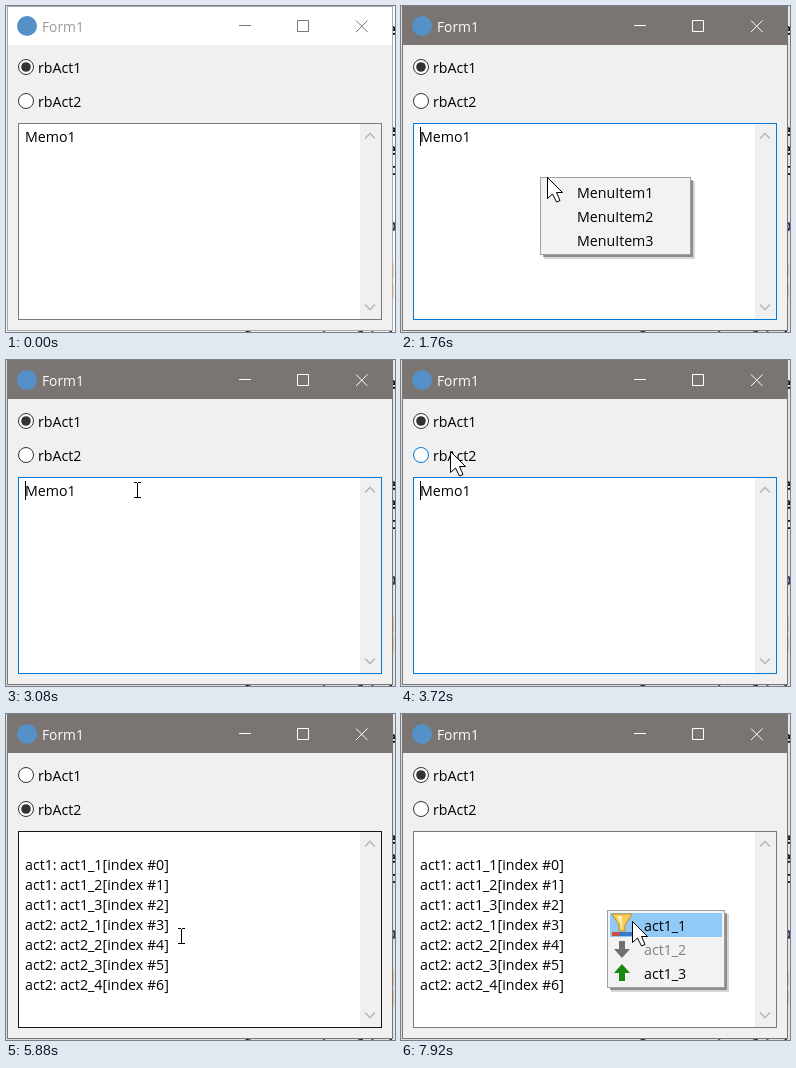
Write an HTML page that moves like this. It is 389 by 326 pixels and loops after 8 s.

```html
<!DOCTYPE html>
<html lang="en">
<head>
<meta charset="utf-8">
<title>Form1</title>
<style>
  html, body { margin: 0; width: 100%; height: 100%; overflow: hidden; }
  svg { display: block; width: 389px; height: 326px; font: 14.2px "Open Sans", "Noto Sans", sans-serif; }
  text { white-space: pre; }
  .code { font: bold 16px "DejaVu Sans Mono", monospace; }
  .beam { mix-blend-mode: difference; }
</style>
</head>
<body>
<svg id="stage" viewBox="0 0 389 326"></svg>
<script>
const LOOP = 8000, STEP = 40;
const BLUE = '#0078d7', DARK = '#333';
const stage = document.getElementById('stage');

// Pointer path: time, x, y
const path = [
  [720, 300, 270], [1120, 139, 171], [1720, 139, 171], [1760, 146, 171],
  [2120, 210, 213], [2320, 210, 213], [2440, 214, 214], [2600, 214, 214],
  [2640, 216, 214], [3440, 62, 62], [3720, 49, 91], [3840, 49, 91],
  [3960, 44, 94], [4040, 44, 94], [4280, 85, 70], [4800, 146, 181],
  [5240, 146, 181], [5600, 175, 222], [5880, 175, 222], [6320, 60, 50],
  [6560, 60, 52], [6800, 116, 80], [6840, 116, 80], [7200, 206, 196],
  [7800, 206, 196], [7920, 231, 207], [LOOP, 231, 207]
];
const menus = [
  { x: 139, y: 171, w: 151, open: 1440, close: 2640, items: ['MenuItem1', 'MenuItem2', 'MenuItem3'] },
  { x: 146, y: 181, w: 118, open: 5120, close: 5840, items: ['act2_1', 'act2_2', 'act2_3', 'act2_4'] },
  { x: 206, y: 196, w: 118, open: 7440, close: LOOP, items: ['act1_1', 'act1_2', 'act1_3'], icons: true, disabled: 1 }
];
const log = [1, 2, 3, 4, 5, 6, 7].map((n, i) => {
  const group = i < 3 ? 1 : 2;
  return `act${group}: act${group}_${group === 1 ? n : n - 3}[index #${i}]`;
});

const text = (x, y, s, fill = '#000', more = '') => `<text x="${x}" y="${y}" fill="${fill}" ${more}>${s}</text>`;
const rect = (x, y, w, h, fill, more = '') => `<rect x="${x}" y="${y}" width="${w}" height="${h}" fill="${fill}" ${more}/>`;
const line = (d, stroke, width = 1) => `<path d="${d}" fill="none" stroke="${stroke}" stroke-width="${width}"/>`;
const shape = (d, fill, more = '') => `<path d="${d}" fill="${fill}" ${more}/>`;

function pointerAt(t) {
  const i = path.findIndex(p => p[0] > t);
  if (i === 0) return null;
  const [t0, x0, y0] = path[i - 1], [t1, x1, y1] = path[i];
  const k = (t - t0) / (t1 - t0);
  return { x: Math.round(x0 + (x1 - x0) * k), y: Math.round(y0 + (y1 - y0) * k) };
}

function backdrop(active) {
  const glyphs = [['e', 29], ['e', 130], ['e', 149], ['t', 169], ['p', 225], [']', 269], [']', 289]];
  return rect(0, 0, 389, 326, active ? '#dedede' : '#f0f0f0') +
    rect(387, 0, 2, 326, active ? '#e4e4e4' : '#fafafa') +
    glyphs.map(([s, y]) => text(381, y, s, s === 'p' ? '#335' : s === ']' ? '#c80' : '#111', 'class="code"')).join('') +
    text(236, 336, 'for  assign list', '#222', 'class="code"');
}

function frame(active) {
  const ink = active ? '#fff' : '#777';
  return rect(1.5, .5, 385, 324, '#f0f0f0', `stroke="${active ? '#777' : '#aaa'}"`) +
    rect(2, 1, 384, 38, active ? '#7a7473' : '#fff') +
    '<circle cx="21" cy="20" r="10" fill="#5690c8"/>' +
    text(36, 25.5, 'Form1', active ? '#fff' : '#999', 'font-size="13.8"') +
    line('M233 19.5H245M291.5 14.5H302.5V25.5H291.5ZM350 14.5L361.5 26M361.5 14.5L350 26', ink);
}

function radio(y, label, checked, hover) {
  const ink = hover ? BLUE : DARK;
  return `<circle cx="20" cy="${y}" r="7.5" fill="#fff" stroke="${ink}"/>` +
    (checked ? `<circle cx="20" cy="${y}" r="4.8" fill="${ink}"/>` : '') +
    text(32, y + 5.5, label);
}

function memo(border, lines, caret) {
  return rect(12.5, 117.5, 363, 196, '#fff', `stroke="${border}"`) +
    rect(354, 118, 21, 195, '#f0f0f0') +
    line('M359 132.5L364 127.5L369 132.5M359 298.5L364 303.5L369 298.5', '#bbb', 1.7) +
    lines.map((s, i) => text(19, 136 + 20 * i, s)).join('') +
    (caret ? rect(19, 121, 1, 19, '#000') : '');
}

function icon(i, x, y) {
  if (i === 0) return shape(`M${x - 10} ${y - 11}H${x + 10}L${x + 3} ${y}V${y + 6}H${x - 3}V${y}Z`, '#f5cd58', 'stroke="#c58b24"') +
    shape(`M${x - 5} ${y - 9}H${x}V${y + 4}H${x - 1}V${y}Z`, '#fff0b0') +
    rect(x - 10, y + 7, 20, 4, '#3d78c4') + rect(x - 10, y + 7, 7, 4, '#d34b3c');
  const s = i === 1 ? 1 : -1;
  return shape(`M${x - 3} ${y - 8 * s}h6v${8 * s}h5L${x} ${y + 9 * s}L${x - 8} ${y}h5Z`, s > 0 ? '#707070' : '#188a12');
}

function popup(m, t, p) {
  const { x, y, w, items } = m, h = items.length * 24 + 6;
  const row = p.x > x + 8 ? Math.floor((p.y - y - 3) / 24) : -1;
  const label = i => text(x + 37, y + 21 + 24 * i, items[i], i === m.disabled ? '#808080' : '#000');
  const highlight = i => rect(x + 3, y + 3 + 24 * i, w - 6, 24, '#91c9f7');
  if (t >= m.close) {
    const fade = .67 * (1 - (t - m.close) / 240);
    return m === menus[0] && fade > 0 ? `<g opacity="${fade}">${highlight(1) + label(1)}</g>` : '';
  }
  const opacity = Math.min(1, .4 + (t - m.open) / 200);
  return `<g opacity="${opacity}">` +
    rect(x + 4, y + 4, w, h, '#000', 'opacity=".16"') + rect(x + 3, y + 3, w - 1, h - 1, '#000', 'opacity=".35"') +
    rect(x + .5, y + .5, w - 1, h - 1, '#f2f2f2', 'stroke="#a0a0a0"') +
    (items[row] ? highlight(row) : '') +
    items.map((_, i) => label(i) + (m.icons ? icon(i, x + 15, y + 15 + 24 * i) : '')).join('') + '</g>';
}

function cursor({ x, y }, beam) {
  return beam
    ? `<path class="beam" d="M${x - 3} ${y - 7.5}h3m1 0h3M${x + .5} ${y - 7}v15M${x - 3} ${y + 7.5}h3m1 0h3" fill="none" stroke="#fff"/>`
    : `<g transform="translate(${x + .5} ${y + .5})">${shape('M0 0V21L5 16.5L9 24.5L12.5 23L9 15H15Z', '#fff', 'stroke="#000"')}</g>`;
}

function render(t) {
  const p = pointerAt(t), active = t >= 1280;
  const menu = menus.find(m => t >= m.open && t < m.close + 240);
  const isOpen = menu && t < menu.close;
  const inMemo = p && !isOpen && p.x > 12 && p.x < 376 && p.y > 117 && p.y < 314;
  const focused = active && t < 4000;
  const second = t >= 4000 && t < 6480;
  const over = y => p && p.x > 11 && p.x < 80 && Math.abs(p.y - y) < 12;
  const lines = t < 5080 ? ['Memo1'] : ['', ...log];
  stage.innerHTML = backdrop(active) + frame(active) +
    radio(61, 'rbAct1', !second, over(61) || t >= 6480 && t < 6880) +
    radio(95, 'rbAct2', second, over(95)) +
    memo(focused ? BLUE : inMemo ? '#171717' : '#7a7a7a', lines, focused) +
    (menu ? popup(menu, t, p) : '') +
    (p ? cursor(p, inMemo) : '');
}

let last = -1;
function tick(now) {
  const t = Math.floor(now % LOOP / STEP) * STEP;
  if (t !== last) render(last = t);
  requestAnimationFrame(tick);
}
render(0);
requestAnimationFrame(tick);
</script>
</body>
</html>
```
